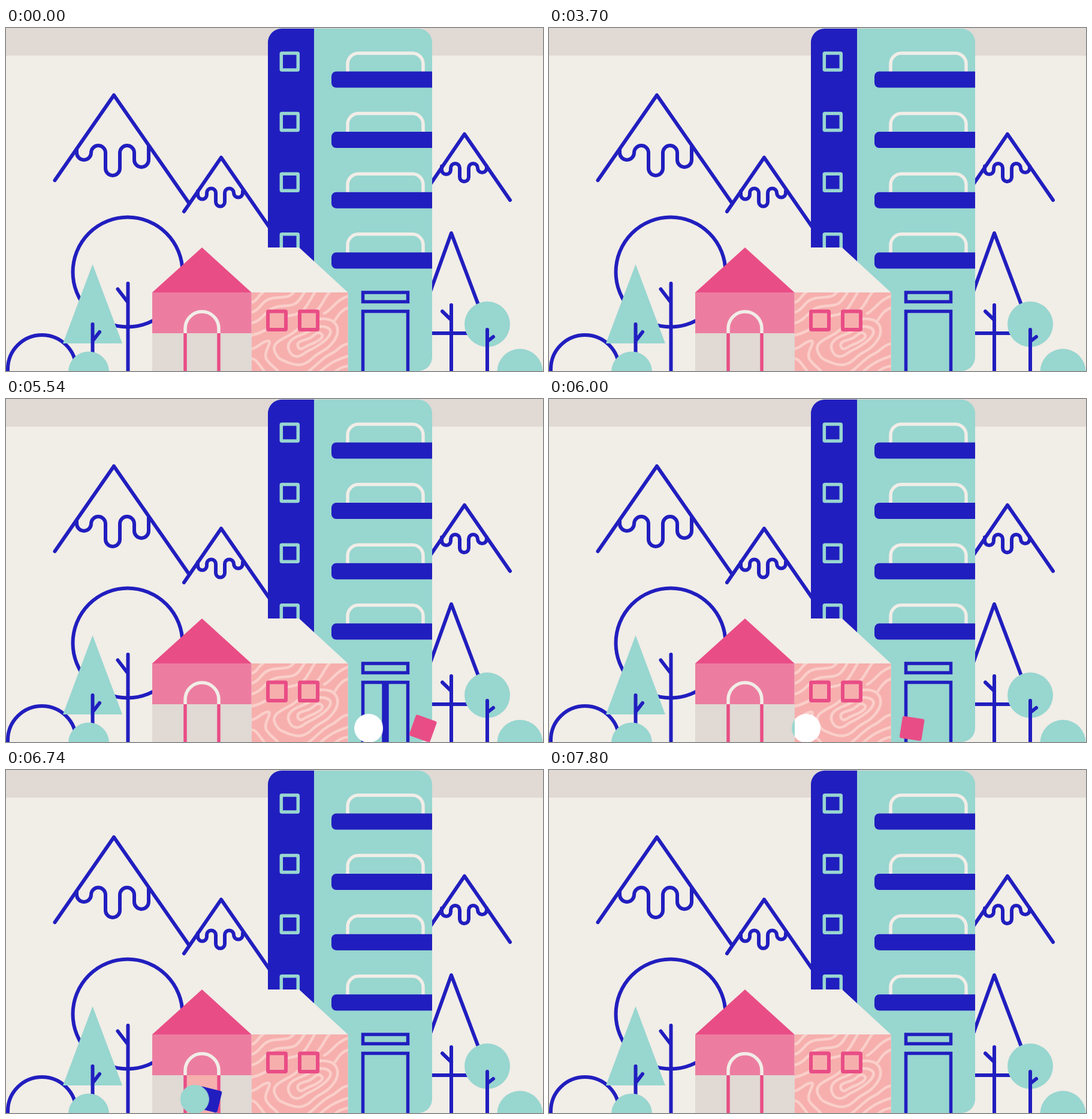
Recreate the animation shown at these times as an HTML page without scripts. Size 896 by 572 pixels, loop 9.62 s.

```html
<!DOCTYPE html>
<html lang="en">
<head>
<meta charset="utf-8">
<title>Homes</title>
<style>
:root { --blue: #211ebf; --teal: #98d6d0; --cream: #f1ede7; --stone: #e0d9d4; --pink: #e94d86; --rose: #ec7da1; --salmon: #f6afad; --loop: 9620ms; }
html, body { margin: 0; width: 100%; height: 100%; overflow: hidden; background: var(--cream); }
.stage, .layer, .gate { position: absolute; left: 0; top: 0; width: 896px; height: 572px; overflow: hidden; }
svg { display: block; }
.line { fill: none; stroke: var(--blue); stroke-width: 6; stroke-linecap: round; stroke-linejoin: round; }
.teal { fill: var(--teal); }
.blue { fill: var(--blue); }
.cream { fill: var(--cream); }
.grain { fill: none; stroke: #facfca; stroke-width: 4.5; stroke-linecap: round; }

/* the lift lights one floor at a time */
.lift { animation: lift var(--loop) step-end infinite; }
@keyframes lift {
  0% { opacity: 0; }
  4.158% { opacity: 1; transform: translateY(0); }
  20.79% { opacity: 1; transform: translateY(100.6px); }
  26.611% { opacity: 1; transform: translateY(201.2px); }
  32.225% { opacity: 1; transform: translateY(301.8px); }
  38.462%, 100% { opacity: 0; }
}

.door { transform-box: fill-box; transform-origin: center; transform: scaleX(0); animation: tower-door var(--loop) ease-in-out infinite; }
.home { animation-name: home-door; }
@keyframes tower-door {
  0%, 41.788% { transform: scaleX(0); }
  45.218%, 54.054% { transform: scaleX(1); }
  59.252%, 100% { transform: scaleX(0); }
}
@keyframes home-door {
  0%, 63.929% { transform: scaleX(0); }
  67.568%, 77.963% { transform: scaleX(1); }
  81.081%, 100% { transform: scaleX(0); }
}

/* colours swap where the two houses meet */
.outside { --ball: #fff; --box: var(--pink); clip-path: inset(0 0 0 409.5px); }
.inside { --ball: var(--teal); --box: var(--blue); clip-path: inset(0 486.5px 0 0); }
.gate { animation: gate var(--loop) step-end infinite both; }
.walk { position: absolute; left: 0; top: 549px; animation: walk var(--loop) infinite both; }
.ball, .box { position: absolute; }
.ball { left: -24px; top: -24px; width: 48px; height: 48px; border-radius: 50%; background: var(--ball); }
.box { left: -18.5px; top: -18px; width: 37px; height: 37px; border-radius: 3px; background: var(--box); animation: roll var(--loop) linear infinite both; }
.late, .late * { animation-delay: 460ms; }
@keyframes gate {
  0% { clip-path: inset(0 0 0 606px); }
  50.416% { clip-path: inset(0); }
  69.023%, 100% { clip-path: inset(0 538.5px 0 0); }
}
@keyframes walk {
  0%, 44.595% { transform: translateX(580px); animation-timing-function: cubic-bezier(.25, .55, .5, 1); }
  50.416% { transform: translateX(705px); animation-timing-function: cubic-bezier(.5, 0, .62, 1); }
  69.023% { transform: translateX(296px); animation-timing-function: cubic-bezier(.3, .2, .6, 1); }
  74.22%, 100% { transform: translateX(386px); }
}
@keyframes roll {
  0%, 44.595% { transform: rotate(-60deg); }
  50.416% { transform: rotate(45deg); }
  52.807% { transform: rotate(20deg); }
  57.588% { transform: rotate(-81deg); }
  65.281% { transform: rotate(-256deg); }
  69.023% { transform: rotate(-300deg); }
  74.22%, 100% { transform: rotate(-200deg); }
}
</style>
</head>
<body>
<div class="stage">
<svg width="896" height="572" viewBox="0 0 896 572">
  <defs>
    <path id="snow" d="M320 272v6a7.5 7.5 0 0 0 15 0v-3a7.5 7.5 0 0 1 15 0v15a7.5 7.5 0 0 0 15 0v-15a7.5 7.5 0 0 1 15 0a7.5 7.5 0 0 0 15 0v-3"/>
    <rect id="pane" x="459.3" y="42" width="28" height="28" rx="1" fill="none" stroke="#98d6d0" stroke-width="5.5"/>
    <g id="balcony">
      <path d="M570 75V60a18 18 0 0 1 18-18h90a18 18 0 0 1 18 18v15" fill="none" stroke="#f1ede7" stroke-width="5.5"/>
      <path class="blue" d="M711 72.5H551a8 8 0 0 0-8 8v11a8 8 0 0 0 8 8h160z"/>
    </g>
    <clipPath id="wall"><path d="M409.500 441h161v131h-161z"/></clipPath>
    <clipPath id="tower"><rect x="437" y="1" width="274" height="571" rx="23"/></clipPath>
  </defs>

  <rect class="cream" width="896" height="572"/>
  <rect width="896" height="46" fill="#e0d9d4"/>

  <!-- hills and trees -->
  <g class="line">
    <path d="M81.500 254L180 112L306 293M297 306L359 216L440 333M705 265L765 177L841 287"/>
    <path d="M118 203v5a12 12 0 0 0 24 0a12 12 0 0 1 24 0v26a12 12 0 0 0 24 0v-26a12 12 0 0 1 24 0v12a12 12 0 0 0 24 0v-23"/>
    <use href="#snow"/>
    <use href="#snow" x="407" y="-41.500"/>
    <circle cx="203" cy="407" r="91.500"/>
    <circle cx="60" cy="569" r="57"/>
    <path d="M743 342L683 509H806z"/>
  </g>
  <path class="teal" d="M144.500 394L95 526H194z"/>
  <circle class="teal" cx="803" cy="494" r="38"/>
  <path class="line" d="M144.500 494V580M156 507L146 520M203.500 426V580M186.500 435.500L203 457M743 462V580M728 472.500L743 487M803 503V580M813 515L804 522"/>
  <circle class="teal" cx="138" cy="573.500" r="34"/>
  <circle class="teal" cx="857.500" cy="573" r="38"/>

  <!-- tower -->
  <g clip-path="url(#tower)">
    <rect class="teal" x="437" width="274" height="572"/>
    <rect class="blue" x="437" width="77" height="572"/>
  </g>
  <rect class="lift cream" x="461" y="44" width="24" height="24" opacity="0"/>
  <use href="#pane"/><use href="#pane" y="100.600"/><use href="#pane" y="201.200"/><use href="#pane" y="301.800"/>
  <use href="#balcony"/><use href="#balcony" y="100.600"/><use href="#balcony" y="201.200"/><use href="#balcony" y="301.800"/>
  <rect class="door blue" x="606" y="475" width="54" height="97"/>
  <g fill="none" stroke="#211ebf" stroke-width="5.500">
    <rect x="595.500" y="441" width="75" height="15.500"/>
    <rect x="595.500" y="472.500" width="75" height="110"/>
  </g>

  <!-- low house -->
  <path class="cream" d="M327 366H489L570.500 441V572H409V441z"/>
  <path d="M409.500 441h161v131h-161z" fill="#f6afad"/>
  <g class="grain" clip-path="url(#wall)">
    <path d="M488 533C482 523 496 521 505 518S518 504 526 510S516 525 507 528S493 539 488 533z"/>
    <path d="M472 537C466 521 486 514 497 510S518 494 534 499S538 518 523 528S506 536 497 543S477 550 472 537z"/>
    <path d="M449 541C440 523 468 517 481 507S506 484 530 485S559 505 547 522S523 539 512 550S490 565 474 559S455 553 449 541z"/>
    <path d="M407 475C427 471 424 452 449 450S472 449 482 439"/>
    <path d="M407 493C432 488 432 466 458 464S485 462 499 439"/>
    <path d="M407 513C442 507 454 482 476 479S502 463 516 439"/>
    <path d="M407 458C419 457 419 447 430 440"/>
    <path d="M407 536C423 533 424 524 436 522S427 541 435 553S451 566 456 576"/>
    <path d="M407 552C417 549 421 561 434 576"/>
    <path d="M500 576C516 566 526 551 541 544S557 528 574 526"/>
    <path d="M521 576C533 565 542 556 574 546"/>
    <path d="M546 576C554 568 561 565 574 563"/>
    <path d="M515 474C529 463 530 450 541 439M531 476C545 469 550 453 574 446M549 487C556 476 562 468 574 466"/>
  </g>
  <g fill="#f6afad" stroke="#e94d86" stroke-width="6">
    <rect x="437" y="472.500" width="30" height="30.500" rx="1"/>
    <rect x="490" y="472.500" width="30" height="30.500" rx="1"/>
  </g>

  <!-- pink house -->
  <path d="M327 366L409.500 441H244z" fill="#e94d86"/>
  <rect x="244" y="441" width="165.500" height="68" fill="#ec7da1"/>
  <rect x="244" y="509" width="165.500" height="63" fill="#e0d9d4"/>
  <rect class="door home" x="302" y="509" width="50" height="63" fill="#f6afad"/>
  <path d="M299 509V501a28 28 0 0 1 56 0V509" fill="none" stroke="#f1ede7" stroke-width="5.500"/>
  <path d="M299 509V572M355 509V572" stroke="#e94d86" stroke-width="5.500"/>
</svg>

<div class="layer outside">
  <div class="gate late"><div class="walk"><div class="box"></div></div></div>
  <div class="gate"><div class="walk"><div class="ball"></div></div></div>
</div>
<div class="layer inside">
  <div class="gate late"><div class="walk"><div class="box"></div></div></div>
  <div class="gate"><div class="walk"><div class="ball"></div></div></div>
</div>
</div>
</body>
</html>
```
